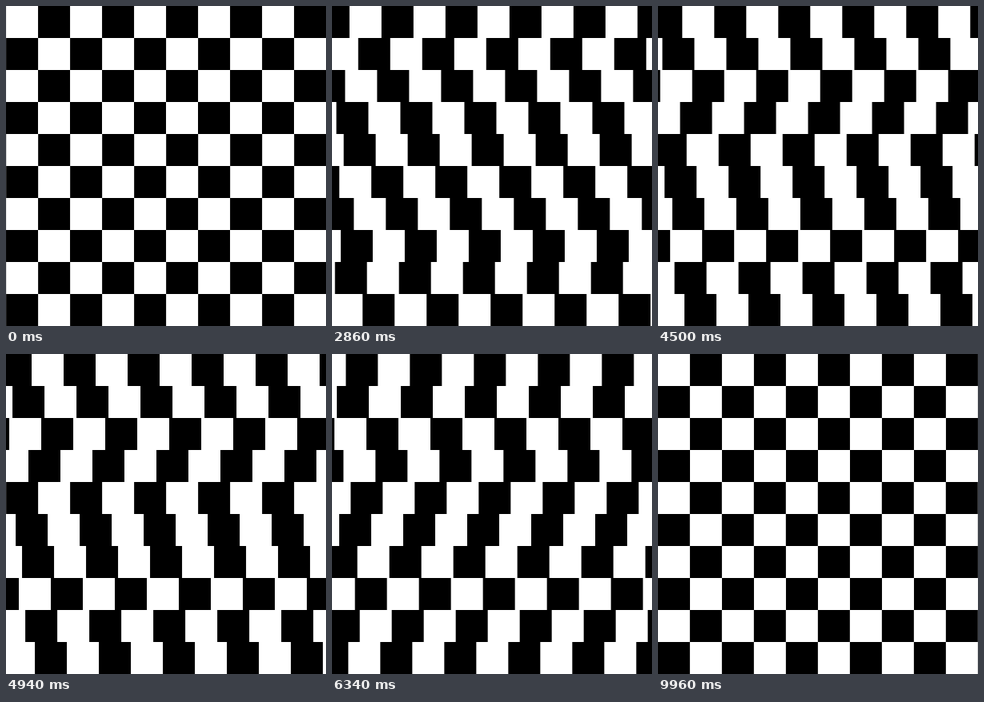
Recreate the animation shown at these times as an HTML page. Size 400 px wide and 400 px high, loop 10000 ms.

```html
<!DOCTYPE html>
<html lang="en">
<head>
<meta charset="utf-8">
<title>Sliding checkerboard</title>
<style>
  html, body { margin: 0; width: 100%; height: 100%; overflow: hidden; background: #fff; }
  svg { display: block; width: 100vw; height: 100vh; }
</style>
</head>
<body>
<svg id="board" viewBox="0 0 400 400"></svg>
<script>
const LOOP = 10000, STEP = 20;
const CELL = 40, PERIOD = 2 * CELL, WIDTH = 400;
// Full board widths each row travels in one loop
const laps = [4, 6, 3, 1, 10, 9, 5, 2, 8, 7];

const board = document.getElementById('board');
let cells = '';
for (let x = 0; x <= WIDTH; x += PERIOD) cells += `M${x} 0h${CELL}v${CELL}h${-CELL}z`;

const rows = laps.map(() => {
  const row = document.createElementNS('http://www.w3.org/2000/svg', 'path');
  row.setAttribute('d', cells);
  row.setAttribute('fill', '#000');
  board.appendChild(row);
  return row;
});

const sigmoid = p => 1 / (1 + Math.exp(-20 * (p - 0.5)));

function draw(ms) {
  const t = Math.floor((ms % LOOP) / STEP) * STEP;
  const travel = WIDTH * sigmoid(t / LOOP);
  rows.forEach((row, i) => {
    const start = i % 2 ? 0 : CELL;
    const x = (start + laps[i] * travel) % PERIOD - PERIOD;
    row.setAttribute('transform', `translate(${x.toFixed(3)} ${i * CELL})`);
  });
}

function tick() {
  draw(performance.now());
  requestAnimationFrame(tick);
}
tick();
</script>
</body>
</html>
```
